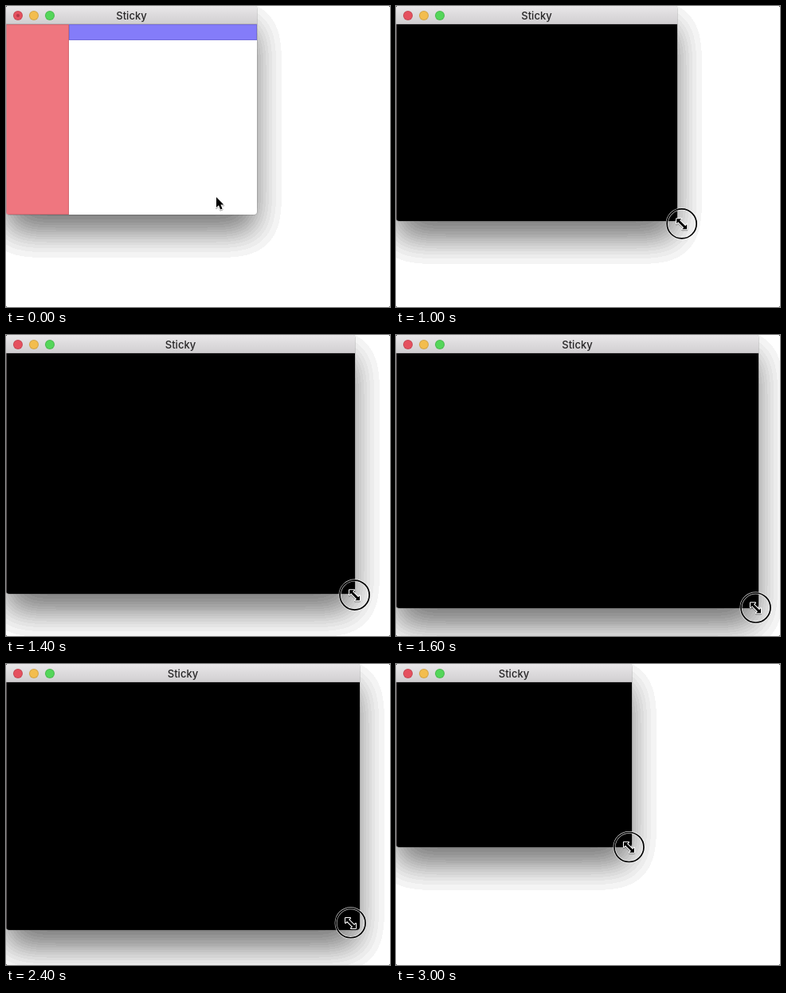
Write an HTML page with a canvas that moves like this. It is 482x378 px and loops after 3.1 s.

```html
<!DOCTYPE html>
<html lang="en">
<head>
<meta charset="utf-8">
<title>Sticky</title>
<style>
  html, body { margin: 0; width: 100%; height: 100%; overflow: hidden; background: #000; }
  #stage { position: relative; width: 482px; height: 378px; overflow: hidden; border-radius: 2.5px; background: #fff; }
  #shadow, #pointer { position: absolute; left: 0; top: 0; }
  #window {
    position: absolute; left: 0; top: 0; overflow: hidden;
    border-radius: 4px; background: #fff; box-shadow: 0 0 0 1px rgba(0, 0, 0, .13);
  }
  #window::after {
    content: ""; position: absolute; left: 0; top: 23px; bottom: 0;
    width: 1px; background: rgba(170, 160, 164, .6);
  }
  #bar {
    position: relative; box-sizing: border-box; height: 23px;
    border-bottom: 1px solid #b5b2b5; background: linear-gradient(#e9e7e9, #d1cfd1);
    font: 500 13px/25px Inter, sans-serif; color: #262526; text-align: center;
  }
  .light {
    position: absolute; top: 6px; width: 12px; height: 12px; box-sizing: border-box;
    border: 1px solid rgba(0, 0, 0, .13); border-radius: 50%;
  }
  .close { left: 9px; background: #e5515f; }
  .minimize { left: 29px; background: #f3bd4e; }
  .zoom { left: 49px; background: #54d65a; }
  .edited .close::after {
    content: ""; position: absolute; left: 3px; top: 3px; width: 4px; height: 4px;
    border-radius: 50%; background: #b23848;
  }
  #content { position: absolute; top: 23px; bottom: 0; width: 100%; }
  #content > * { position: absolute; box-shadow: inset 0 0 0 1px rgba(0, 0, 0, .12); }
  #side { width: 25%; height: 100%; background: #ef767f; }
  #head { left: 25%; right: 0; height: 20px; background: #847cf9; }
  .black { background: #000; }
  .black > * { display: none; }
  .outlined { fill: #000; stroke: #fff; stroke-width: 2; paint-order: stroke; stroke-linejoin: round; }
  #arrow, #resize { filter: drop-shadow(0 1px .7px rgba(0, 0, 0, .35)); }
</style>
</head>
<body>
<div id="stage">
  <canvas id="shadow" width="482" height="378"></canvas>
  <div id="window">
    <div id="bar">
      <i class="light close"></i><i class="light minimize"></i><i class="light zoom"></i>Sticky
    </div>
    <div id="content"><div id="side"></div><div id="head"></div></div>
  </div>
  <svg id="pointer" width="482" height="378">
    <g id="cursor">
      <path id="arrow" class="outlined" d="M0 0V13L3 10.3 5.2 15.5 7.6 14.5 5.4 9.4H9.3Z"/>
      <path id="resize" class="outlined" transform="translate(0 .3) scale(1.08)"
        d="M-6-6H-.5L-2.3-4.2 4.2 2.3 6 .5V6H.5L2.3 4.2-4.2-2.3-6-.5Z"/>
      <g id="ring" fill="none">
        <circle r="18.5" stroke="#fff" stroke-width="3" opacity=".8"/>
        <circle r="18.5" stroke="#000" stroke-width="1.7"/>
      </g>
    </g>
  </svg>
</div>
<script>
const LOOP = 3100, TICK = 100;
const WIDTH = 482, HEIGHT = 378;
const $ = id => document.getElementById(id);

// Poses hold window width and height, then pointer x and y.
// Each value eases with its own power, so the pointer leads the window.
const rest = [315, 262, 264, 240];
const approach = { start: 0, end: 500, to: [315, 262, 313, 263], power: [1, 1, 1, 1] };
const grow = { start: 700, end: 1600, to: [455, 343, 451.5, 342.5], power: [.97, 1.47, .87, 1.35] };
const shrink = { start: 2200, end: 2920, to: [296, 230, 292.5, 230], power: [1.43, 1.37, 1.2, 1.09] };

const clamp = p => Math.min(1, Math.max(0, p));
const smooth = p => p * p * (3 - 2 * p);

function poseAt(time) {
  return [approach, grow, shrink].reduce((pose, { start, end, to, power }) => {
    const p = clamp((time - start) / (end - start));
    return pose.map((v, i) => v + (to[i] - v) * smooth(p ** power[i]));
  }, rest);
}

const context = $('shadow').getContext('2d');
const image = context.createImageData(WIDTH, HEIGHT);

// logistic approximation of the normal distribution
const normal = z => 1 / (1 + Math.exp(-1.5976 * z - 0.07056 * z ** 3));

function profile(length, start, end) {
  const sigma = 21;
  return Array.from({ length }, (_, i) =>
    normal((i + .5 - start) / sigma) - normal((i + .5 - end) / sigma));
}

// soft shadow in visible grey bands, cut off at its faint rim
function drawShadow(width, height) {
  const offset = 23, band = 8, rim = 10;
  const across = profile(WIDTH, 0, width);
  const down = profile(HEIGHT, offset, height + offset);
  for (let y = 0, i = 0; y < HEIGHT; y++) {
    for (let x = 0; x < WIDTH; x++, i += 4) {
      const depth = 145 * across[x] * down[y];
      const grey = depth < rim ? 255 : 244 - band * Math.floor((depth - rim) / band);
      image.data[i] = image.data[i + 1] = image.data[i + 2] = grey;
      image.data[i + 3] = 255;
    }
  }
  context.putImageData(image, 0, 0);
}

const show = (id, visible) => $(id).style.display = visible ? '' : 'none';

function render(time) {
  const [width, height, x, y] = poseAt(time);
  const released = 1800;
  const during = delay => (time >= grow.start + delay && time < released) || time >= shrink.start + delay;
  drawShadow(Math.round(width), Math.round(height));
  $('window').style.width = Math.round(width) + 'px';
  $('window').style.height = Math.round(height) + 'px';
  $('bar').classList.toggle('edited', time < grow.start);
  $('content').classList.toggle('black', during(TICK));
  $('cursor').setAttribute('transform', `translate(${x} ${y})`);
  show('arrow', time < approach.end);
  show('resize', time >= approach.end);
  show('ring', during(0));
}

const start = performance.now();
let shown = -1;
function frame() {
  const elapsed = (performance.now() - start) % LOOP;
  const time = Math.floor(elapsed / TICK) * TICK;
  if (time !== shown) render(shown = time);
  requestAnimationFrame(frame);
}
frame();
</script>
</body>
</html>
```
